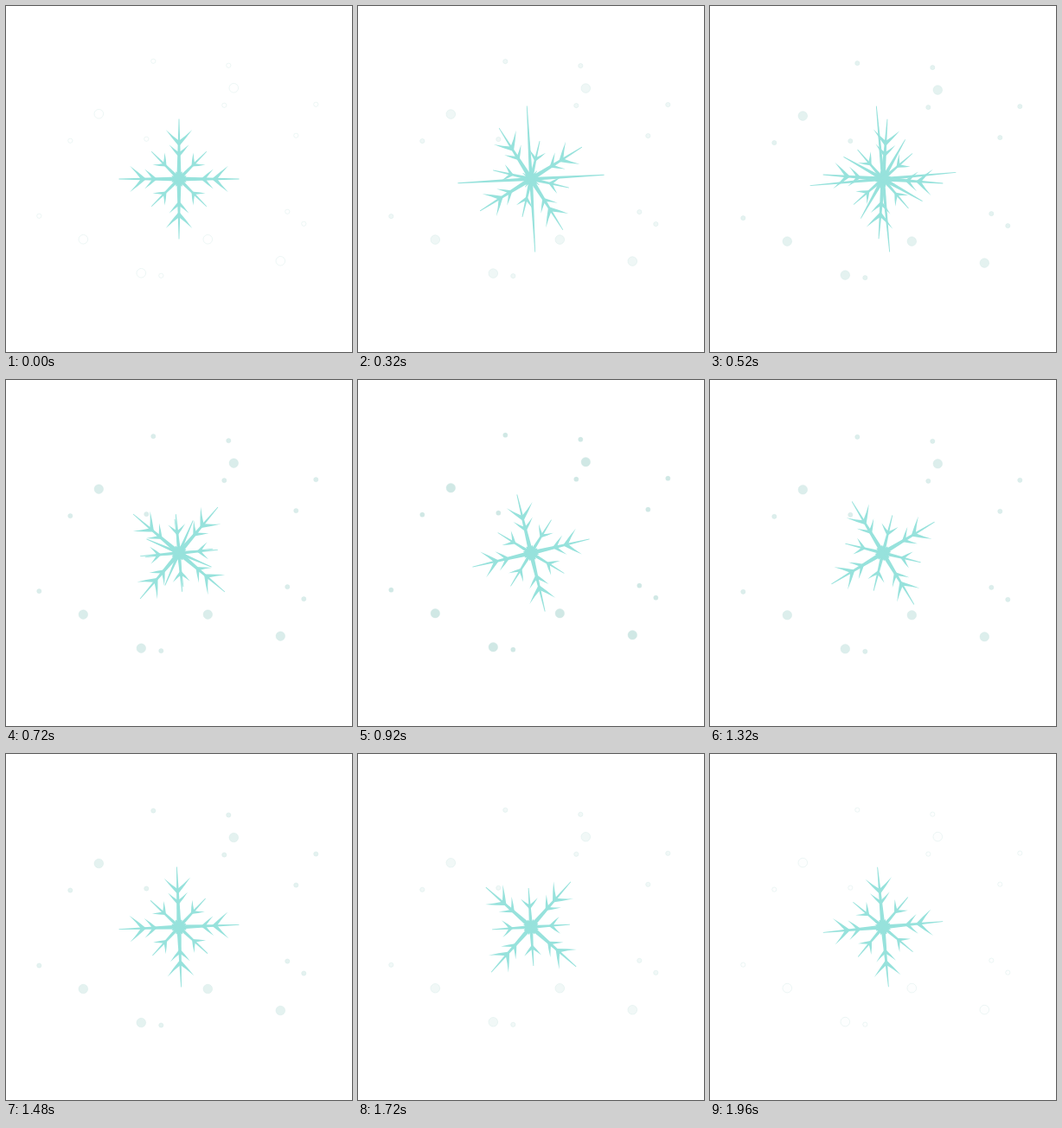
These frames come from a looping animation (400 px wide and 400 px high, 2000 ms). An HTML page with a canvas:

```html
<!DOCTYPE html>
<html lang="en">
<head>
<meta charset="utf-8">
<title>Snowflake</title>
<style>
html, body { margin: 0; width: 100%; height: 100%; overflow: hidden; background: #fff; }
canvas { display: block; width: 400px; height: 400px; }
</style>
</head>
<body>
<canvas id="stage" width="400" height="400"></canvas>
<script>
const ctx = document.getElementById('stage').getContext('2d');
const LOOP = 2000, STEP = 40, TAU = Math.PI * 2;
const ICE = '#97e2dc', SNOW = '204,230,227';

// Key points of the snow: the first BIG of them are large
const BIG = 6;
const snow = [
  [263, 95], [107, 125], [89, 270], [233, 270], [156, 309], [317, 295],
  [170, 64], [257, 69], [252, 115], [358, 114], [335, 150], [74, 156],
  [162, 154], [325, 238], [344, 252], [38, 243], [179, 312]
];

// Repeats draw() around the centre, with the part pointing up
function around(count, deg, draw) {
  for (let i = 0; i < count; i++) {
    ctx.save();
    ctx.translate(200, 200);
    ctx.rotate(deg * Math.PI / 180 + i * TAU / count);
    draw();
    ctx.restore();
  }
}

// A tapering needle that ends in a hairline tip
function needle(len, half) {
  const tip = 0.4;
  ctx.beginPath();
  ctx.moveTo(-half, 0);
  ctx.lineTo(-tip, -len);
  ctx.lineTo(tip, -len);
  ctx.lineTo(half, 0);
  ctx.fill();
}

// A pair of curved barbs, slanting out from the stem
function barbs(root, reach) {
  const thick = 1.6 + reach * 0.1, tip = root + reach * 1.04;
  for (const side of [-1, 1]) {
    const bend = (along, off) => [side * reach * along, -root - reach * along + off];
    ctx.beginPath();
    ctx.moveTo(0, -root + thick);
    ctx.quadraticCurveTo(...bend(0.55, 2), side * reach, -tip);
    ctx.quadraticCurveTo(...bend(0.45, -1.2), 0, -root - thick);
    ctx.fill();
  }
}

function arm(len, half, roots) {
  needle(len, half);
  for (const root of roots) barbs(root, 3 + root * 0.3);
}

function hump(t, start, end) {
  return t > start && t < end ? Math.sin(Math.PI * (t - start) / (end - start)) : 0;
}

function drawSnow(t) {
  const alpha = 1 - Math.abs(t / 1000 - 1);
  const bob = 1.25 * (1 - Math.cos(TAU * (13 * t / LOOP + 0.05)));
  ctx.fillStyle = `rgba(${SNOW},${alpha})`;
  ctx.strokeStyle = `rgba(${SNOW},0.6)`;
  ctx.lineWidth = 0.6;
  snow.forEach(([x, y], i) => {
    ctx.beginPath();
    ctx.arc(x + 0.3, y - 0.3 + bob, i < BIG ? 5.3 : 2.6, 0, TAU);
    ctx.fill();
    ctx.stroke();
  });
}

function drawFlake(t) {
  const turn = t * 0.181;
  const long = 91 * hump(t, 0, 840);
  const mid = 55 * hump(t, 280, 880);
  ctx.fillStyle = ICE;
  around(4, -t * 0.01, () => needle(long, long * 0.024));
  around(4, 45 - t * 0.03, () => needle(mid, mid * 0.045));
  around(4, turn, () => arm(69.5, 2.6, [28, 41]));
  around(4, turn + 45, () => arm(45, 2.1, [23]));
  around(8, turn + 22.5, () => needle(9, 3.5));
}

function frame(now) {
  const t = Math.floor((now % LOOP + 0.01) / STEP) * STEP % LOOP;
  ctx.fillStyle = '#fff';
  ctx.fillRect(0, 0, 400, 400);
  drawSnow(t);
  drawFlake(t);
  requestAnimationFrame(frame);
}
frame(0);
</script>
</body>
</html>
```
